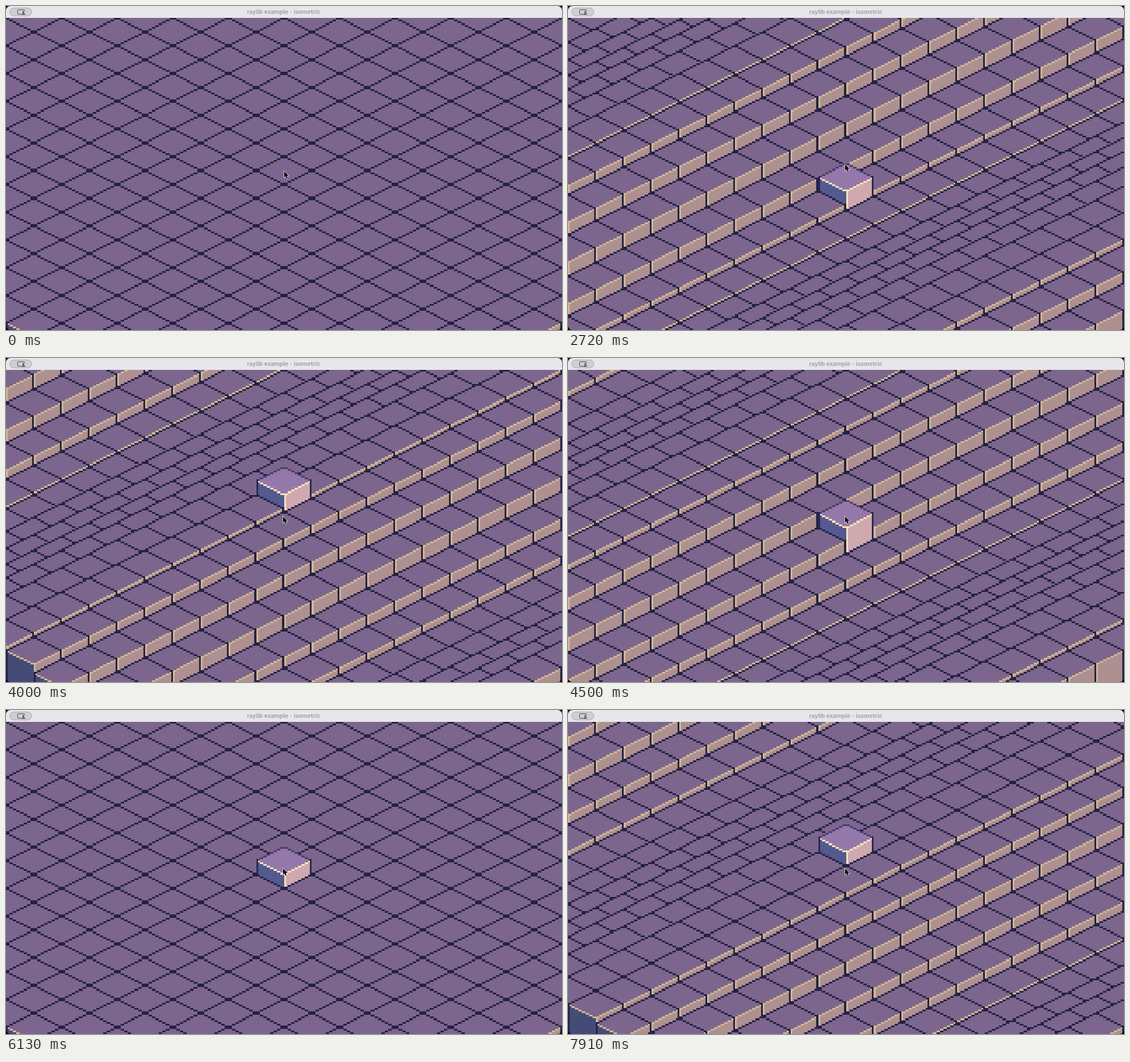
An HTML page with a canvas that plays this animation: 979x572 px, repeating every 7.99 s.

```html
<!DOCTYPE html>
<html lang="en">
<head>
<meta charset="utf-8">
<title>Isometric</title>
<style>
  html, body { margin: 0; width: 100%; height: 100%; overflow: hidden; background: #000; }
  canvas { display: block; }
</style>
</head>
<body>
<canvas id="stage" width="979" height="572"></canvas>
<script>
const LOOP = 7990, STEP = 81.2;
const W = 979, H = 572, BAR = 21;
const LOW_W = 320, LOW_H = 180, SCALE = W / LOW_W;
const LAST = 20, HOVER = 10, LIFT = 8, SIDE = 24;
const SWELL = 16, RAMP = 0.027, SPEED = 0.003165;

// Each burst of waves fades in from its start and out towards its end.
const bursts = [
  { start: 1810, end: 6122, phase: -7.076 },
  { start: 7410, end: 9000, phase: -2.18 }
];

const ctx = document.getElementById('stage').getContext('2d');
const low = makeCanvas(LOW_W, LOW_H);
const plain = makeTile({
  top: '#7d668d', rim: '#252244', line: '#252244', edge: '#cfb893', left: '#454b77', right: '#ae9091'
});
const bright = makeTile({
  top: '#9478a9', rim: '#4a3d6c', line: '#2c2850', edge: '#fbe3bb', left: '#525a8f', right: '#cfa9af'
});

function makeCanvas(w, h) {
  const c = document.createElement('canvas');
  c.width = w;
  c.height = h;
  return c.getContext('2d');
}

// A block with a 32x16 diamond on top; its centre is at (16, 8).
function makeTile(color) {
  const g = makeCanvas(32, 16 + SIDE);
  const box = (c, x, y, w, h) => { g.fillStyle = c; g.fillRect(x, y, w, h); };
  for (let s = 0; s < 8; s++) {
    const x = 2 * s, y = 8 + s;
    box(color.left, x, y, 2, SIDE);
    box(color.right, 30 - x, y, 2, SIDE);
  }
  for (let s = 0; s < 8; s++) {
    const x = 2 * s;
    box(color.top, 14 - x, s, 4 + 2 * x, 1);
    box(color.rim, 14 - x, s, 2, 1);
    box(color.rim, 16 + x, s, 2, 1);
    box(color.top, x, 8 + s, 32 - 2 * x, 1);
    box(color.edge, x, 8 + s, 2, 1);
    box(color.edge, 30 - x, 8 + s, 2, 1);
  }
  box(color.line, 0, 7, 1, SIDE + 1);
  box(color.line, 31, 7, 1, SIDE + 1);
  box(color.edge, 16, 16, 1, SIDE);
  return g.canvas;
}

const clamp = (v, lo, hi) => Math.max(lo, Math.min(hi, v));

// The picture advances in steps of about 81 ms.
function hold(t) {
  const start = t < 1800 ? 350 : 1830;
  return Math.max(0, start + STEP * Math.floor((t - start) / STEP + 0.2));
}

function waveAt(t) {
  const { start, end, phase } = bursts.find(b => t < b.end + 500);
  return {
    height: clamp(RAMP * Math.min(t - start, end - t), 0, SWELL),
    phase: phase + SPEED * (t - start)
  };
}

function drawField(t) {
  low.fillStyle = '#000';
  low.fillRect(0, 0, LOW_W, LOW_H);
  const wave = waveAt(t);
  const active = t >= 345;
  const lift = LIFT * clamp((t - 330) / 580, 0, 1);
  for (let i = -8; i <= LAST; i++) {
    const drop = wave.height * Math.sin(i / 2 + wave.phase);
    for (let j = -8; j <= LAST; j++) {
      const x = 144 + 16 * (i - j);
      if (x <= -32 || x >= LOW_W) continue;
      const hovered = active && i === HOVER && j === HOVER;
      const y = -80 + 8 * (i + j) + drop - (hovered ? lift : 0);
      low.drawImage(hovered ? bright : plain, x, Math.round(y));
    }
  }
  ctx.imageSmoothingEnabled = false;
  ctx.drawImage(low.canvas, 0, H - LOW_H * SCALE, W, LOW_H * SCALE);
}

function drawBar() {
  ctx.fillStyle = '#e7e6eb';
  ctx.fillRect(0, 0, W, BAR);

  ctx.beginPath();
  ctx.roundRect(6.5, 3.5, 39, 14, 7);
  ctx.fillStyle = '#cfced2';
  ctx.fill();
  ctx.strokeStyle = '#aaa9ad';
  ctx.lineWidth = 1;
  ctx.stroke();

  ctx.strokeStyle = '#4c4b50';
  ctx.beginPath();
  ctx.roundRect(20.5, 6.5, 12, 8, 1.5);
  ctx.stroke();
  ctx.fillStyle = '#cfced2';
  ctx.fillRect(27, 9, 7, 7);
  ctx.fillStyle = '#4c4b50';
  ctx.beginPath();
  ctx.arc(30.5, 10.7, 1.6, 0, 7);
  ctx.fill();
  ctx.beginPath();
  ctx.ellipse(30.5, 15.2, 3.2, 2.4, 0, Math.PI, 0);
  ctx.fill();

  ctx.fillStyle = '#a5a3a8';
  ctx.font = 'bold 10.2px Inter, sans-serif';
  ctx.textAlign = 'center';
  ctx.textBaseline = 'alphabetic';
  ctx.fillText('raylib example - isometric', 489, 14);
}

const path = [[350, 490, 292], [1080, 486, 284], [1200, 483, 283], [1320, 488, 280]];

function cursorAt(t) {
  if (t <= path[0][0]) return path[0].slice(1);
  for (let k = 1; k < path.length; k++) {
    const [t0, x0, y0] = path[k - 1], [t1, x1, y1] = path[k];
    if (t < t1) {
      const p = (t - t0) / (t1 - t0);
      return [x0 + (x1 - x0) * p, y0 + (y1 - y0) * p];
    }
  }
  return path[path.length - 1].slice(1);
}

const arrow = new Path2D('M0 0V10.6L2.4 8.4L4.1 12.4L6 11.6L4.3 7.7H7.6Z');

function drawCursor(t) {
  const [x, y] = cursorAt(t);
  ctx.save();
  ctx.translate(x, y);
  ctx.lineWidth = 1.4;
  ctx.strokeStyle = '#e8e6ee';
  ctx.stroke(arrow);
  ctx.fillStyle = '#000';
  ctx.fill(arrow);
  ctx.restore();
}

function render(now) {
  const t = hold(now % LOOP);
  ctx.fillStyle = '#000';
  ctx.fillRect(0, 0, W, H);
  ctx.save();
  ctx.beginPath();
  ctx.roundRect(0, 0, W, H, 8);
  ctx.clip();
  drawField(t);
  drawBar();
  drawCursor(t);
  ctx.restore();
}

const begin = performance.now();
function loop() {
  render(performance.now() - begin);
  requestAnimationFrame(loop);
}
loop();
</script>
</body>
</html>
```
